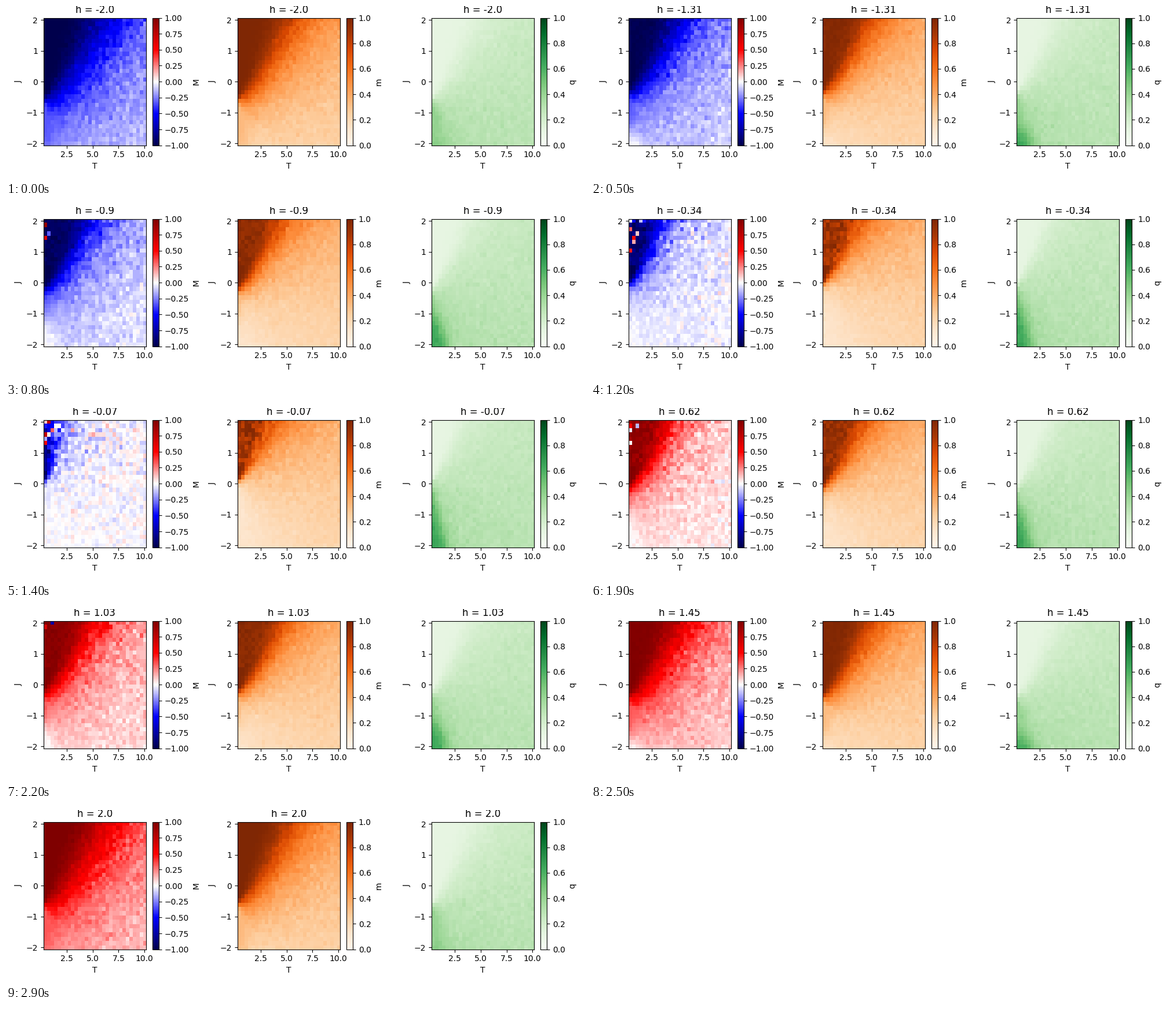
Recreate the animation shown at these times as a matplotlib script. Size 1000 by 300 pixels, loop 3 s.

```python
import itertools

import matplotlib.pyplot as plt
import numpy as np
from matplotlib.animation import FuncAnimation

FRAMES = 30
T_AXIS = np.linspace(0.4, 10, 30)
J_AXIS = np.linspace(-2, 2, 30)
H_AXIS = np.linspace(-2, 2, FRAMES)
T, J = np.meshgrid(T_AXIS, J_AXIS)

# All 512 states of a periodic 3x3 spin lattice.
spins = np.array(list(itertools.product([-1, 1], repeat=9))).reshape(-1, 3, 3)
bonds = sum((spins * np.roll(spins, 1, axis)).sum((1, 2)) for axis in (1, 2))
total = spins.sum((1, 2))
checker = 1 - 2 * (np.indices((3, 3)).sum(0) % 2)
mag = total / 9
stagger = np.abs((spins * checker).sum((1, 2))) / 9
OBSERVABLES = np.stack([mag, np.abs(mag), stagger,
                        mag**2, stagger**2], axis=1)
COUPLING = J * (0.63 + 0.22 * np.exp(-T / 1.5))


def step_down(x, centre, sharpness):
    return 1 / (1 + np.exp(sharpness * (x - centre)))


def boltzmann_means(h):
    log_w = (COUPLING[..., None] * bonds + h * total) / T[..., None]
    w = np.exp(log_w - log_w.max(axis=2, keepdims=True))
    w /= w.sum(axis=2, keepdims=True)
    return np.moveaxis(w @ OBSERVABLES, 2, 0)


def sampled_maps(k):
    """Thermal averages with the scatter of a short Monte Carlo run."""
    h = H_AXIS[k]
    rng = np.random.default_rng(100 + k)
    M, m, q, mag2, q2 = boltzmann_means(h)

    def scatter(second, mean, samples):
        sd = np.sqrt(np.maximum(second - mean**2, 0))
        return sd * rng.normal(size=T.shape) / np.sqrt(samples)

    dM = scatter(mag2, M, 50)
    dm = scatter(mag2, m, 110)
    dq = scatter(q2, q, 200)

    # Antiferromagnetic runs freeze into either sign at low temperature.
    frozen = (step_down(J, -1.1 * abs(h) - 0.1, 6)
              * step_down(T, 0.8 * np.abs(J), 3))
    M, m, q = (value + (limit - value) * frozen
               for value, limit in ((M, 0), (m, 0.13), (q, 0.66)))

    # Ferromagnetic runs order slowly, or stay in the wrong well.
    weak = np.exp(-h * h)
    slow = 1 - 0.22 * weak * rng.random(T.shape) * ((J > 0.5) & (T < 2 * J))
    stuck = T < 1.3 * (J - 0.5) - 0.6 * abs(h)
    stuck &= rng.random(T.shape) < 0.5 * weak
    well = np.where(stuck, rng.uniform(-1, 0.7, T.shape), 1)

    return (np.clip((M + dM) * slow * well, -1, 1),
            np.clip((m + dm) * slow, 0, 1),
            np.clip(q + dq, 0, 1))


def draw_panel(ax, label, cmap, vmin, ticks):
    dt, dj = (T_AXIS[1] - T_AXIS[0]) / 2, (J_AXIS[1] - J_AXIS[0]) / 2
    image = ax.imshow(np.zeros(T.shape), cmap=cmap, vmin=vmin, vmax=1,
                      origin="lower", aspect="auto", interpolation="nearest",
                      extent=[T_AXIS[0] - dt, T_AXIS[-1] + dt,
                              J_AXIS[0] - dj, J_AXIS[-1] + dj])
    ax.set_xticks([2.5, 5, 7.5, 10])
    ax.set_yticks([-2, -1, 0, 1, 2])
    ax.set_xlabel("T")
    ax.set_ylabel("J")
    fig.colorbar(image, ax=ax, ticks=ticks, label=label)
    return image


plt.rcParams.update({"font.family": "DejaVu Sans", "font.size": 10})
fig, axes = plt.subplots(1, 3, figsize=(10, 3), dpi=100)
images = [
    draw_panel(axes[0], "M", "seismic", -1, np.linspace(-1, 1, 9)),
    draw_panel(axes[1], "m", "Oranges", 0, np.linspace(0, 1, 6)),
    draw_panel(axes[2], "q", "Greens", 0, np.linspace(0, 1, 6)),
]
fig.tight_layout()
titles = [ax.set_title("") for ax in axes]


def update(k):
    for image, title, values in zip(images, titles, sampled_maps(k)):
        image.set_data(values)
        title.set_text(f"h = {round(float(H_AXIS[k]), 2)}")
    return images + titles


anim = FuncAnimation(fig, update, frames=FRAMES, interval=100, repeat=True)
plt.show()
```
